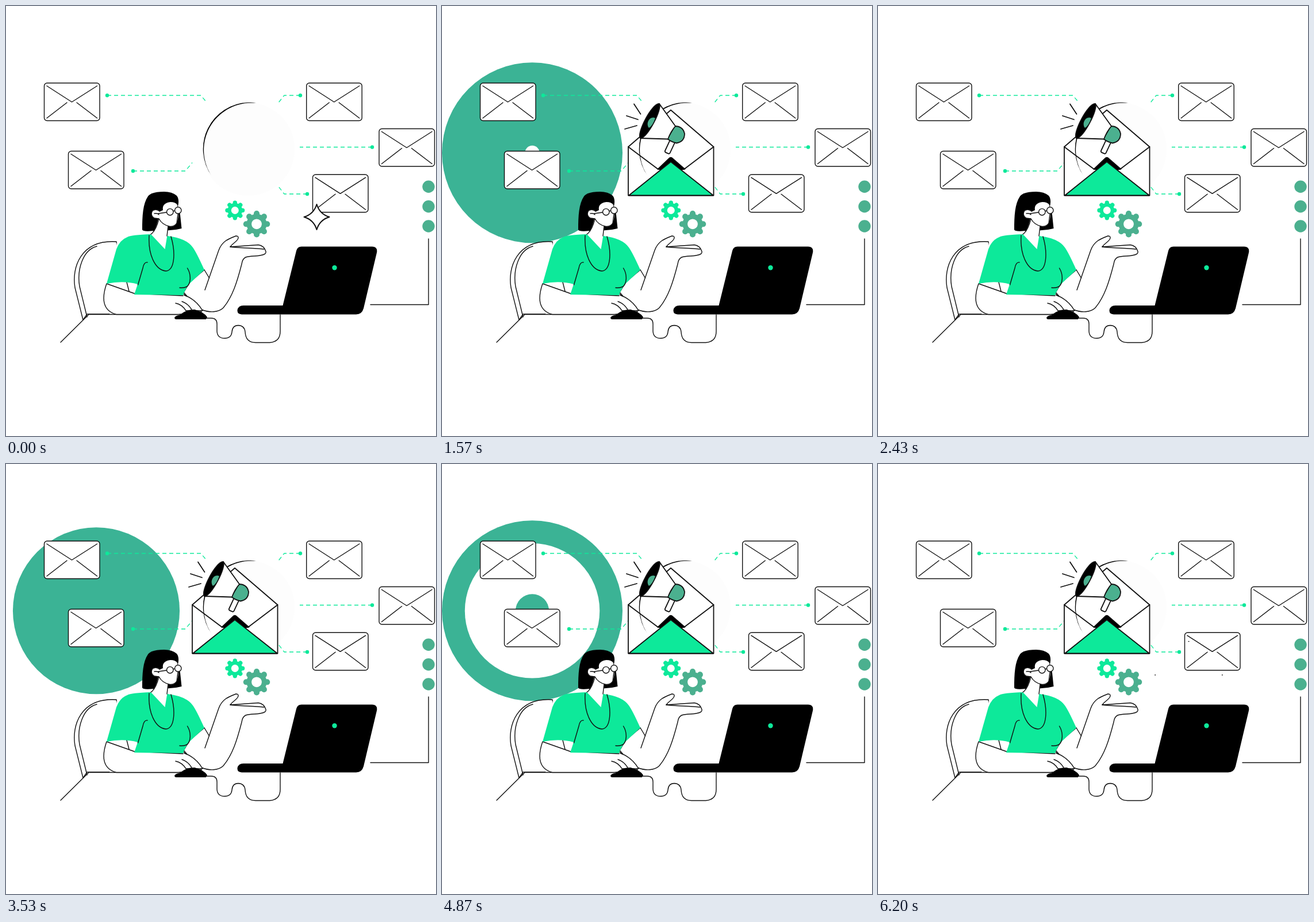
An HTML page for the animation above (6.23 s loop, 748 by 748 pixels).

```html
<!DOCTYPE html>
<html lang="en">
<head>
<meta charset="utf-8">
<title>Email campaign</title>
<style>
  html, body { margin: 0; height: 100%; overflow: hidden; background: #fff; }
  svg { display: block; width: 100vw; height: 100vh; }
  .line { fill: none; stroke: #111; stroke-width: 1.4; stroke-linecap: round; stroke-linejoin: round; }
  .skin { fill: #fff; }
  .mint { fill: #0de99a; }
  .teal { fill: #4bb08f; }
  .dash { fill: none; stroke: #0de99a; stroke-width: 1.3; stroke-dasharray: 7 5; }
  .bold { stroke-width: 1.8; }
</style>
</head>
<body>
<svg viewBox="0 0 748 748">
  <defs>
    <g id="mail" class="line">
      <rect width="96.500" height="65.500" rx="5" fill="#fff"/>
      <path d="M4.500 5L48 33L92 5M4.500 61L39.500 34M56.500 34L92 61"/>
    </g>
    <g id="gear">
      <path d="M-13.300 0H13.300M0-13.300V13.300M-9.400-9.400L9.400 9.400M-9.400 9.400L9.400-9.400"
        stroke="currentColor" stroke-width="7.400" stroke-linecap="round"/>
      <circle r="12.800" fill="currentColor"/>
      <circle r="6.500" fill="#fff"/>
    </g>
  </defs>

  <g id="ripple"></g>

  <!-- connectors -->
  <circle cx="421" cy="249" r="81" fill="#fdfdfd"/>
  <g class="dash">
    <path d="M176 155.500H339L349 167.500"/>
    <path d="M221 287H312L324 272.500"/>
    <path d="M512 155.500H484L472.500 170"/>
    <path d="M637 245.500H511"/>
    <path d="M524 327H484L474 314"/>
  </g>
  <g class="mint">
    <circle cx="176" cy="155.500" r="3.200"/>
    <circle cx="221" cy="287" r="3.200"/>
    <circle cx="512" cy="155.500" r="3.200"/>
    <circle cx="637" cy="245.500" r="3.200"/>
    <circle cx="524" cy="327" r="3.200"/>
  </g>

  <use href="#mail" x="66.500" y="134"/>
  <use href="#mail" x="108.500" y="252.500"/>
  <use href="#mail" x="522.700" y="134"/>
  <use href="#mail" x="649" y="213.500"/>
  <use href="#mail" x="533.500" y="293.300"/>

  <!-- open envelope with megaphone -->
  <g id="campaign">
    <path class="line bold" fill="#fff" d="M324 245L398 181L472.500 245V329.500H324Z" style="fill:#fff"/>
    <path class="line bold" d="M324 245L376 284M472.500 245L421 284"/>
    <path d="M374 284L395 264Q398 261.500 401 264L424 284L398 290Z"/>
    <path class="mint" stroke="#111" stroke-width="1.800" stroke-linejoin="round" d="M325 329.500L398 271L472 329.500Z"/>
  </g>
  <path d="M435 168.500Q430 167.500 421 167.800A81 81 0 0 0 358 296A83 82 0 0 1 421 168.800Z"/>
  <g id="megaphone" class="line bold">
    <path d="M334 170.500L345.500 188M321 191L341 197.500M318 214L339 208"/>
    <rect x="-4.700" y="-4" width="9.400" height="28" rx="2.500" transform="translate(401.500 234) rotate(25)" style="fill:#fff"/>
    <path class="teal" d="M405 209Q419 209 422 222Q422 236 408 238.500Q400 237 392 231Z" style="fill:#4bb08f"/>
    <path d="M378 170L406 209Q398 218 393 231.500L345 230Z" style="fill:#fff"/>
    <path d="M378 170C384 178 357 231 345 230C338 222 365 169 378 170Z" style="fill:#000"/>
    <path d="M371 195Q366 209 360 212C355 207 358 194 368 194Z" stroke="none" style="fill:#4bb08f;stroke:none"/>
  </g>

  <use href="#gear" color="#0de99a" transform="translate(398.300 355.500)"/>
  <use href="#gear" color="#4bb08f" transform="translate(436 379.300) scale(1.370)"/>

  <!-- side line and dots -->
  <g class="teal">
    <circle cx="735" cy="314.300" r="10.700"/>
    <circle cx="735" cy="348.700" r="10.700"/>
    <circle cx="735" cy="383" r="10.700"/>
  </g>
  <path class="line" d="M735 405V519.500H634"/>

  <g id="spark" class="line" transform="translate(540.500 367)" stroke-width="2"></g>

  <!-- chair and table -->
  <path class="line" style="fill:#fff" d="M134 546L120 490C114 455 130 406 192 410L215 500L180 536H141Z" stroke="none"/>
  <path fill="#fff" d="M136 548L144 537H200V410H193L180 536Z"/>
  <path class="line" d="M141 541L128 488C123 458 134 424 158 418"/>
  <path class="line" d="M95 585L144 536.500H300"/>

  <!-- right arm -->
  <path class="line skin" style="fill:#fff" d="M346 494L370 425C376 409 387 405 400 400Q406 400 403 406C400 411 394 413 390 419L439 415.500Q449 417 452 427Q453 432 444 433.500C434 436 427 434 417 437Q411 440 410 449C402 480 394 506 378 525C370 533 354 534 340 528L308 500L320 480L345 459"/>
  <path class="line" d="M390 419C405 421 430 421 449 423M345 459L353.500 473"/>

  <!-- left arm -->
  <path class="line" style="fill:#fff" d="M175 483C166 509 168 530 192 536.500H300L340 532C333 518 323 511 308 504L223 500Z"/>

  <!-- shirt -->
  <path class="mint" d="M211 402Q217 398 253 397L281 400Q314 404 325 420Q331 428 345 459L317 485Q312 493 308 503L223 502L229 484Q205 477 175 483L192 423Q198 407 211 402Z"/>

  <!-- head -->
  <path d="M237 389C237 365 238 344 247 331Q253 323 275 323Q289 323 297 330Q302 336 299 349L303 363L305.500 387Q291 391 277 390L257 391Q238 393 237 389Z"/>
  <path class="skin" d="M273 355Q271 343 286 341Q295 341 298 346L300 362Q299 380 291 383.500Q286 385 282 383L280 402L276.500 423L252 397Q260 392 265 370Q254 371 253 362Q253 354 262 354Q267 355 267 358Z"/>
  <path class="line" d="M267 357Q261 352 255 356Q250 364 258 369L266 370M266 370Q272 381 285 383.500Q293 384 297 378L299 362M266 370Q261 391 252 397M282 383L280 400"/>
  <path class="line" d="M258 361Q264 360 266 363M265 361L279 359M290.500 357L293.500 356"/>
  <circle class="line" cx="285.300" cy="358.300" r="5.700" style="fill:#fff"/>
  <circle class="line" cx="299.300" cy="355.500" r="5.700" style="fill:#fff"/>

  <!-- clothing details -->
  <path class="line" d="M249 399C247 432 259 459 278 461C294 460 295 428 287 401"/>
  <path class="line" d="M246 446Q240 445 238 456L229.500 485M315.500 456C323 468 321 483 315 488Q309 491 302 490"/>

  <!-- hand, mouse and cable -->
  <path class="line" style="fill:#fff" d="M295 517Q306 519 313 530L342 530C335 518 324 508 310 503"/>
  <path class="line" d="M306 514Q316 517 323 528M310 499L315 505"/>
  <path d="M293 543Q293 539 303 537Q313 528 328 528Q344 532 350 541L348 545H295Z"/>
  <path class="line" d="M348 543H357Q367 543 367 553V566Q368 578 380 578Q392 578 393 567Q394 555.500 404 555.500Q415 556 416 567Q417 585.500 434 585.500H459Q477 584 477 566V537"/>

  <!-- laptop -->
  <path d="M505 426Q507 418.500 514 418.500H637Q647 419 645 429L622 526Q619 536.500 609 536.500H410Q402 536 402.500 529Q404 521 413 521H481.500Z"/>
  <circle class="mint" cx="571.500" cy="455.300" r="4.200"/>
</svg>
<script>
const LOOP = 6230;
const byId = id => document.getElementById(id);
const clamp = v => Math.min(1, Math.max(0, v));
// Eased progress from 0 to 1, starting fast and settling.
const settle = (t, start, duration, power) => 1 - (1 - clamp((t - start) / duration)) ** power;

const rippleStarts = [
  { grow: 0, growTime: 680, open: 1558 },
  { grow: 3170, growTime: 600, open: 4690 }
];
const sparkWindows = [[-30, 600], [2100, 2430], [3765, 4370], [5585, 6230]];

function drawRipple(t) {
  const { grow, growTime, open } = rippleStarts[t < 3000 ? 0 : 1];
  const circle = (r, fill) => r > 0 ? `<circle cx="157" cy="255.300" r="${r}" fill="${fill}"/>` : "";
  const green = "#3bb395";
  byId("ripple").innerHTML = t >= open + 710 ? "" :
    circle(157 * settle(t, grow, growTime, 2.8), green) +
    circle(157.500 * settle(t, open, 600, 3.8), "#fff") +
    circle(153 * settle(t, open + 154, 500, 3.8), green) +
    circle(153.500 * settle(t, open + 300, 410, 1.8), "#fff");
}

function drawSpark(t) {
  const span = sparkWindows.find(([start, end]) => t >= start && t < end);
  let shapes = "";
  if (span) {
    const u = (t - span[0]) / (span[1] - span[0]);
    const r = 22 * clamp(u / 0.045) * (1 - clamp((u - 0.07) / 0.28) ** 2);
    const outer = 59 * settle(u, 0, 1, 3.5);
    const inner = Math.max(r, 59 * settle(u, 0, 1, 1.4));
    const c = r * 0.23;
    if (r > 0.5) shapes += `<path style="fill:#fff;stroke-width:2" d="M0 ${-r}Q${c} ${-c} ${r} 0Q${c} ${c} 0 ${r}Q${-c} ${c} ${-r} 0Q${-c} ${-c} 0 ${-r}Z"/>`;
    if (outer > inner) {
      for (let angle = 0; angle < 360; angle += 90)
        shapes += `<path style="stroke-width:2;stroke-linecap:butt" transform="rotate(${angle})" d="M${inner - 0.5} 0H${outer}"/>`;
    }
  }
  byId("spark").innerHTML = shapes;
}

function frame() {
  const t = performance.now() % LOOP;
  drawRipple(t);
  drawSpark(t);
  const visibility = t < 30 ? "hidden" : "visible";
  byId("campaign").style.visibility = visibility;
  byId("megaphone").style.visibility = visibility;
  requestAnimationFrame(frame);
}
frame();
</script>
</body>
</html>
```
